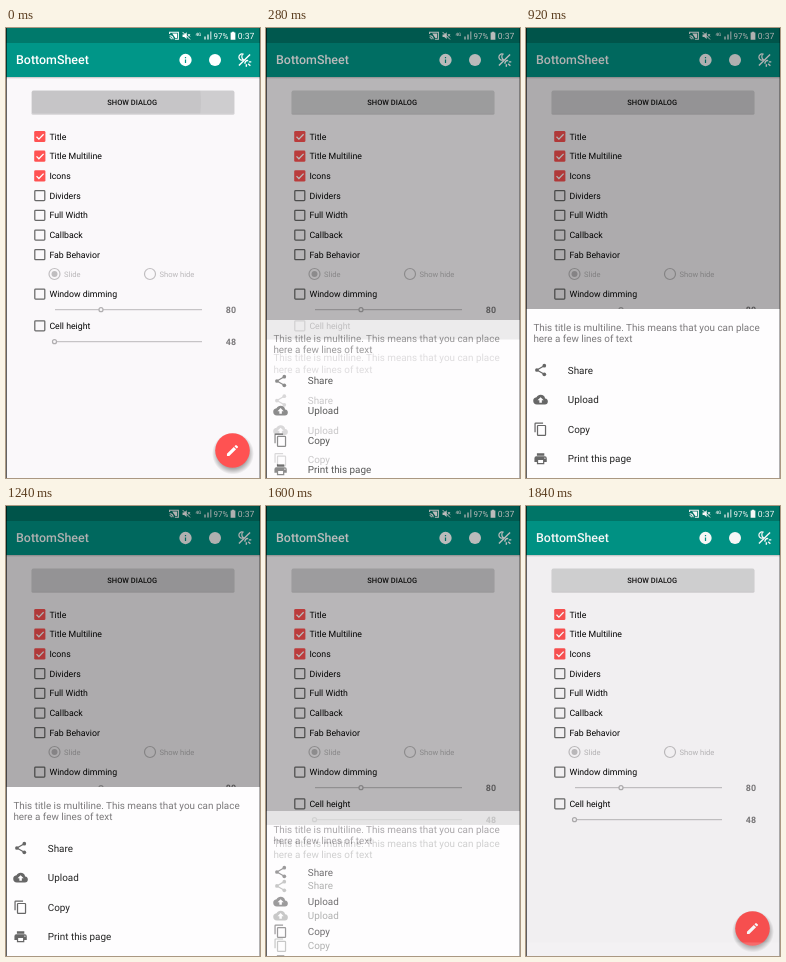
An HTML page that plays this animation: 254x450 px, repeating every 1880 ms.

```html
<!DOCTYPE html>
<html lang="en">
<head>
<meta charset="utf-8">
<title>BottomSheet</title>
<style>
  html, body { margin: 0; width: 100%; height: 100%; overflow: hidden; background: #faf8fa; }
  svg, .layer { position: absolute; left: 0; top: 0; width: 254px; height: 450px; }
  .layer { overflow: hidden; isolation: isolate; }
  .sheet { mix-blend-mode: plus-lighter; }
  #dim { background: #000; opacity: 0; }
  #edge { box-sizing: border-box; border: solid rgba(0, 0, 0, .6); border-width: 0 0 0 1px; }
  #edge::after { content: ""; position: absolute; right: 0; width: 1px; height: 450px; background: rgba(0, 0, 0, .3); }
  text { font-family: Roboto, "Open Sans", sans-serif; text-rendering: geometricPrecision; }
</style>
</head>
<body>
<svg id="page" viewBox="0 0 254 450"></svg>
<div id="dim" class="layer"></div>
<div id="sheets" class="layer"></div>
<div id="edge" class="layer"></div>
<script>
const LOOP = 1880, STEP = 40, HEIGHT = 169, DIM = 0.31;
const $ = id => document.getElementById(id);
const clamp = v => Math.max(0, Math.min(1, v));

const label = (x, y, str, size, fill, weight = 400) =>
  `<text x="${x}" y="${y}" font-size="${size}" fill="${fill}" font-weight="${weight}">${str}</text>`;
const icon = (cx, cy, size, fill, body) =>
  `<g transform="translate(${cx - size / 2} ${cy - size / 2}) scale(${size / 24})" fill="${fill}" fill-rule="evenodd">${body}</g>`;
const path = d => `<path d="${d}"/>`;
const stroke = (d, color, width) =>
  `<path d="${d}" fill="none" stroke="${color}" stroke-width="${width}"/>`;

const ICONS = {
  share: '<circle cx="18" cy="5" r="3"/><circle cx="6" cy="12" r="3"/><circle cx="18" cy="19" r="3"/>' +
    stroke('M18 5L6 12l12 7', '#666', 2),
  cloud: path('M19.35 10.04A7.49 7.49 0 0 0 12 4C9.11 4 6.6 5.64 5.35 8.04A6 6 0 0 0 6 20h13a5 5 0 0 0 .35-9.96zM14 13v4h-4v-4H7l5-5 5 5z'),
  copy: path('M16 1H4a2 2 0 0 0-2 2v14h2V3h12zM19 5H8a2 2 0 0 0-2 2v14a2 2 0 0 0 2 2h11a2 2 0 0 0 2-2V7a2 2 0 0 0-2-2zm0 16H8V7h11z'),
  print: path('M19 8H5a3 3 0 0 0-3 3v6h4v4h12v-4h4v-6a3 3 0 0 0-3-3zm-3 11H8v-5h8zm3-7a1 1 0 1 1 0-2 1 1 0 0 1 0 2zM18 3H6v4h12z'),
  info: path('M12 2a10 10 0 1 0 0 20 10 10 0 0 0 0-20zm1 15h-2v-6h2zm0-8h-2V7h2z'),
  pencil: path('M3 17.25V21h3.75L17.81 9.94l-3.75-3.75zM20.71 7.04a1 1 0 0 0 0-1.41l-2.34-2.34a1 1 0 0 0-1.41 0l-1.83 1.83 3.75 3.75z'),
  theme: stroke('M3 21L21 3', '#fff', 2.3) +
    stroke('M9.500 2.500a5 5 0 1 0 1 9a5.500 5.500 0 0 1-1-9z', '#fff', 2) +
    stroke('M13 18a4 4 0 0 1 5-5M19 15h4M18 18l3.500 3.500M15 19v4', '#fff', 2.3),
  cast: stroke('M2 8V4h20v16h-8M2 12a8 8 0 0 1 8 8M2 16a4 4 0 0 1 4 4', '#fff', 2.4) +
    path('M8 7h11v10h-4z'),
  mute: path('M3 9v6h4l6 5V4L7 9z') + stroke('M3 3l18 18M16 8l5 6M21 8l-5 6', '#fff', 2.2),
  battery: path('M9 2h6v2h3v18H6V4h3z')
};

function statusBar() {
  return '<rect width="254" height="15" fill="#00796b"/>' +
    icon(168, 7.7, 10.5, '#fff', ICONS.cast) +
    icon(180.300, 7.7, 10, '#fff', ICONS.mute) +
    label(189.500, 8, '4G', 4.6, '#fff', 500) +
    '<path d="M198 11.500h2v-3h-2zM201 11.500h2v-5h-2zM204 11.500h1.500v-8H204z" fill="#fff" opacity=".6"/>' +
    label(207.500, 10.8, '97%', 8, '#fff') +
    icon(227, 7.7, 9.5, '#fff', ICONS.battery) +
    label(231.800, 10.8, '0:37', 8.6, '#fff');
}

function toolbar() {
  return '<rect y="15" width="254" height="34" fill="#009688"/>' +
    '<rect y="49" width="254" height="2" fill="url(#drop)"/>' +
    label(10, 36.4, 'BottomSheet', 12.45, '#fff', 500) +
    icon(179.500, 32, 14.8, '#fff', ICONS.info) +
    '<circle cx="209" cy="32" r="6" fill="#fff"/>' +
    icon(238.500, 32, 14.8, '#fff', ICONS.theme);
}

function button() {
  const box = 'x="26" y="62.500" width="202" height="23" rx="1.300"';
  return `<rect x="25.500" y="63" width="203" height="23.800" rx="1.600" fill="#000" opacity=".16"/>
    <rect ${box} fill="#d6d5d7"/>
    <clipPath id="clip"><rect ${box}/></clipPath>
    <g clip-path="url(#clip)"><g id="press" fill="#000">
      <rect ${box} opacity=".04"/><circle id="ripple" cx="105" cy="74" opacity=".04"/></g></g>` +
    label(101.300, 77, 'SHOW DIALOG', 7.5, '#111', 500);
}

function checkRow(str, y, on) {
  const box = on
    ? `<rect x="28.200" y="${y - 5.6}" width="11.200" height="11.200" rx="1.300" fill="#ff5252"/>` +
      stroke(`M30.500 ${y + 0.2}l2.400 2.400 4.700-4.900`, '#fff', 1.3)
    : `<rect x="28.800" y="${y - 5}" width="10" height="10" rx=".8" fill="none" stroke="#686868" stroke-width="1.250"/>`;
  return box + label(43.400, y + 3.1, str, 8.75, '#000');
}

const radio = (x, str, on) =>
  `<circle cx="${x}" cy="246" r="5.500" fill="none" stroke="#c0bec0" stroke-width="1.200"/>` +
  (on ? `<circle cx="${x}" cy="246" r="3" fill="#c0bec0"/>` : '') +
  label(x + 9.6, 248.7, str, 7.55, '#b9b7b9');

const slider = (x, y, value) =>
  stroke(`M49 ${y}H196`, '#c6c4c6', 1.2) +
  `<circle cx="${x}" cy="${y}" r="2" fill="#faf8fa" stroke="#b0aeb0" stroke-width="1.200"/>` +
  label(219.800, y + 3.1, value, 8.9, '#7d7b7d', 700);

function fab() {
  return '<circle cx="227" cy="425.500" r="21" fill="url(#glow)"/>' +
    '<circle cx="226.500" cy="422.500" r="17.300" fill="#ff5252"/>' +
    icon(226.500, 422.5, 14.8, '#fff', ICONS.pencil);
}

function page() {
  const rows = ['Title', 'Title Multiline', 'Icons', 'Dividers', 'Full Width', 'Callback', 'Fab Behavior'];
  return `<defs>
    <linearGradient id="drop" x2="0" y2="1">
      <stop stop-color="#000" stop-opacity=".22"/><stop offset="1" stop-color="#000" stop-opacity="0"/>
    </linearGradient>
    <radialGradient id="glow">
      <stop offset=".72" stop-color="#000" stop-opacity=".32"/><stop offset="1" stop-color="#000" stop-opacity="0"/>
    </radialGradient></defs><rect width="254" height="450" fill="#faf8fa"/>` +
    statusBar() + toolbar() + button() +
    rows.map((str, i) => checkRow(str, 108.5 + i * 19.7, i < 3)).join('') +
    radio(48.5, 'Slide', true) + radio(144, 'Show hide', false) +
    checkRow('Window dimming', 266, false) + slider(95, 281.7, '80') +
    checkRow('Cell height', 297.8, false) + slider(48.5, 313.7, '48') +
    fab();
}

function sheet() {
  const items = [['Share', 'share'], ['Upload', 'cloud'], ['Copy', 'copy'], ['Print this page', 'print']];
  return '<svg class="sheet" viewBox="0 0 254 450"><rect y="281" width="254" height="170" fill="#fefdfe"/>' +
    label(7.4, 302.6, 'This title is multiline. This means that you can place', 9.88, '#7a787a') +
    label(7.4, 314.2, 'here a few lines of text', 9.88, '#7a787a') +
    items.map(([str, name], i) => {
      const y = 342 + i * 29.6;
      return icon(14.6, y, 14.8, '#666', ICONS[name]) + label(41.8, y + 3.5, str, 9.88, '#222');
    }).join('') + '</svg>';
}

$('page').innerHTML = page();
$('sheets').innerHTML = sheet() + sheet();
const [older, newer] = $('sheets').children;

// Each sample is a recorded sheet offset; neighbouring samples cross-fade.
const openAt = k => HEIGHT * clamp((6.5 - k) * 0.17) ** 2;
const closeAt = k => HEIGHT * clamp(0.086 + k * 0.097) ** 2;

function place(el, dy, alpha) {
  el.style.transform = `translateY(${dy}px)`;
  el.style.opacity = dy < HEIGHT ? alpha : 0;
}

function draw(time) {
  const t = Math.floor((time % LOOP) / STEP) * STEP;
  const opening = t < 1000;
  const pos = opening ? (t - 21) / 54.5 : (t - 1476) / 37;
  const k = Math.floor(pos), mix = pos - k;
  const offset = opening ? openAt : closeAt;
  place(older, offset(k), 1 - mix);
  place(newer, offset(k + 1), mix);

  const shade = opening
    ? 1 - (1 - clamp((t - 20) / 400)) ** 2
    : 1 - clamp((t - 1480) / 385) ** 1.7;
  $('dim').style.opacity = DIM * shade;

  $('ripple').setAttribute('r', 90 + t * 0.05 + Math.max(0, t - 160) * 0.25);
  $('press').style.opacity = 1 - clamp((t - 40) / 200);
}

const start = performance.now();
function tick() {
  draw(performance.now() - start);
  requestAnimationFrame(tick);
}
tick();
</script>
</body>
</html>
```
